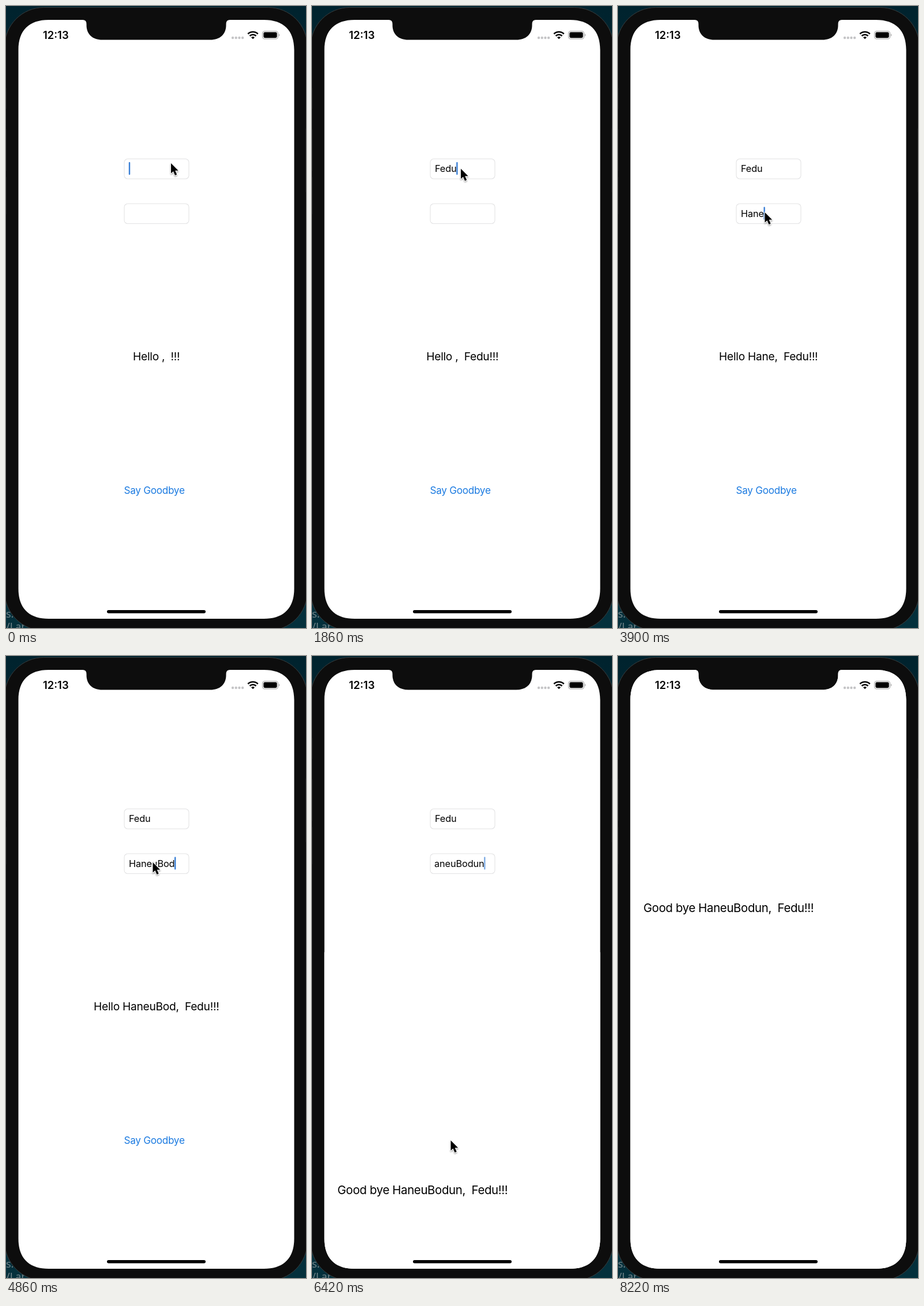
An HTML page for the animation above (8.82 s loop, 520x1076 px).

```html
<!DOCTYPE html>
<html lang="en">
<head>
<meta charset="utf-8">
<title>Greeting form</title>
<style>
  html, body { margin: 0; width: 100%; height: 100%; overflow: hidden; background: #00222c; }
  svg { display: block; width: 100vw; height: 100vh; }
  text { font-family: Inter, "Liberation Sans", sans-serif; white-space: pre; fill: #000; }
  .field { fill: #fff; stroke: #e3e3e4; stroke-width: 1.1; }
  .input { font-size: 16.3px; letter-spacing: -.12px; }
  #hello { font-size: 19.2px; letter-spacing: -.28px; text-anchor: middle; }
  #bye { font-size: 20.4px; letter-spacing: -.37px; }
  #button { font-size: 17.2px; letter-spacing: -.3px; fill: #1c7be1; }
  #clock { font-size: 18.4px; font-weight: 600; }
  .shell { font-size: 18px; fill: #71848a; font-family: "Noto Sans", sans-serif; }
</style>
</head>
<body>
<svg viewBox="0 0 520 1076" preserveAspectRatio="none">
  <defs>
    <linearGradient id="desk" x2="0" y2="1">
      <stop offset="0" stop-color="#00232e"/>
      <stop offset="1" stop-color="#04303c"/>
    </linearGradient>
    <clipPath id="screen">
      <path d="M74 24H133Q139.500 24 139.500 31V33C139.500 49 150 58.500 167 58.500H354
        C371 58.500 381.500 49 381.500 33V31Q381.500 24 388 24H447C481 24 499.500 42 499.500 76
        V1008C499.500 1042 481 1060 447 1060H74C40 1060 21.500 1042 21.500 1008V76C21.500 42 40 24 74 24Z"/>
    </clipPath>
    <clipPath id="inner"><rect x="212.500" y="343" width="98" height="33"/></clipPath>
    <filter id="shade" x="-60%" y="-40%" width="240%" height="200%">
      <feDropShadow dx="0" dy="1.500" stdDeviation="1.300" flood-opacity=".4"/>
    </filter>
  </defs>

  <rect width="520" height="1076" fill="url(#desk)"/>
  <text class="shell" x="0" y="1058">s:</text>
  <text class="shell" x="0" y="1080">/Lar</text>
  <rect x="-2.500" y="2.500" width="525" height="1078" rx="68" fill="#0d0d0d" stroke="#393d3e"/>
  <path d="M.5 142V178M.5 213V285M.5 296V360M519.500 212V322" stroke="#171717"/>

  <g clip-path="url(#screen)">
    <rect width="520" height="1076" fill="#fff"/>
    <rect class="field" x="205" y="264.500" width="112" height="34.500" rx="6"/>
    <rect class="field" x="205" y="342" width="112" height="34.500" rx="6"/>
    <text class="input" id="last" x="213" y="287"></text>
    <g clip-path="url(#inner)"><text class="input" id="first" y="364.500"></text></g>
    <rect id="caret" width="2.400" height="22" rx="1" fill="#3a7fd5"/>
    <text id="hello" x="260.700" y="613"></text>
    <text id="button" x="204.500" y="844">Say Goodbye</text>
    <g id="sheet">
      <rect y="24" width="520" height="1052" fill="#fff"/>
      <text id="bye" x="44" y="443"></text>
    </g>
    <text id="clock" x="64" y="57">12:13</text>
    <g fill="#c5c5c7">
      <circle cx="393" cy="55" r="2.200"/><circle cx="398.700" cy="55" r="2.200"/>
      <circle cx="404.400" cy="55" r="2.200"/><circle cx="410.100" cy="55" r="2.200"/>
    </g>
    <g fill="none" stroke="#000" stroke-width="2.600">
      <path d="M419.300 48.300A12.500 12.500 0 0 1 436.700 48.300"/>
      <path d="M422.500 51.700A8 8 0 0 1 433.500 51.700"/>
    </g>
    <path d="M425 54.200Q428 51.800 431 54.200L428 57.200Z"/>
    <rect x="444.500" y="43.500" width="27" height="13.500" rx="4" fill="none" stroke="#a0a0a0" stroke-width="1.100"/>
    <rect x="446.300" y="45.300" width="23.400" height="9.900" rx="2.400"/>
    <path d="M473 47.800Q475.600 50.200 473 52.700Z" fill="#a0a0a0"/>
    <rect x="175" y="1045" width="171" height="5.500" rx="2.750"/>
  </g>

  <path id="pointer" d="M0 0V17.600L4 13.900L7 21L10.200 19.600L7.200 12.800H12.700Z" fill="#000"
    stroke="#fff" stroke-width="1.800" stroke-linejoin="round" paint-order="stroke" filter="url(#shade)"/>
</svg>
<script>
const LOOP = 8820, FOCUS = 2760, PRESENT = 6324;
const LAST = "Fedu", FIRST = "HaneuBodun";
const lastKeys = [1080, 1260, 1440, 1620];
const firstKeys = [3260, 3460, 3660, 3860, 4060, 4320, 4520, 4720, 4900, 5020];

// Pointer strokes: start, end, target x, target y
const moves = [
  [60, 660, 258, 281.5],
  [2040, 2580, 254.5, 357],
  [5360, 6060, 240.5, 838],
  [7560, 8210, 102, 1080]
];

const el = id => document.getElementById(id);
const clamp = v => Math.min(1, Math.max(0, v));
const ease = p => p * p * (3 - 2 * p);
const typed = (word, keys, t) => word.slice(0, keys.filter(k => k <= t).length);
const setText = (node, s) => { if (node.textContent !== s) node.textContent = s; };

const last = el("last"), first = el("first"), hello = el("hello"), bye = el("bye");
const caret = el("caret"), sheet = el("sheet"), pointer = el("pointer");

function pointerAt(t) {
  let x = 286, y = 272;
  for (const [a, b, tx, ty] of moves) {
    const p = ease(clamp((t - a) / (b - a)));
    x += (tx - x) * p;
    y += (ty - y) * p;
  }
  return [x, y];
}

function blink(t) {
  const since = Math.max(0, ...[FOCUS, ...lastKeys, ...firstKeys].filter(k => k <= t));
  const p = (t - since) % 1000;
  return p < 700 ? 1 - clamp((p - 350) / 150) : clamp((p - 750) / 150);
}

function draw(t) {
  const a = typed(LAST, lastKeys, t), b = typed(FIRST, firstKeys, t);
  setText(last, a);
  setText(first, b);
  setText(hello, `Hello ${b},\u00a0 ${a}!!!`);
  setText(bye, `Good bye ${b},\u00a0 ${a}!!!`);

  // A long entry scrolls so that its end stays by the caret
  const wide = b ? first.getComputedTextLength() : 0;
  const left = Math.min(213, 298.5 - wide);
  first.setAttribute("x", left);
  const second = t >= FOCUS;
  const end = second ? left + wide : 213 + (a ? last.getComputedTextLength() : 0);
  caret.setAttribute("x", Math.max(212.8, end - .4));
  caret.setAttribute("y", second ? 347.5 : 270);
  caret.setAttribute("opacity", blink(t));

  const s = Math.max(0, t - PRESENT) * .01826;
  const rest = (1 + s) * Math.exp(-s);
  sheet.setAttribute("transform", `translate(0 ${rest < .0005 ? 0 : rest * 1036})`);
  sheet.setAttribute("visibility", t < PRESENT ? "hidden" : "visible");

  pointer.setAttribute("transform", `translate(${pointerAt(t)})`);
  pointer.setAttribute("visibility", t < 8220 ? "visible" : "hidden");
}

const start = performance.now();
function tick() {
  draw((performance.now() - start) % LOOP);
  requestAnimationFrame(tick);
}
draw(0);
requestAnimationFrame(tick);
</script>
</body>
</html>
```
